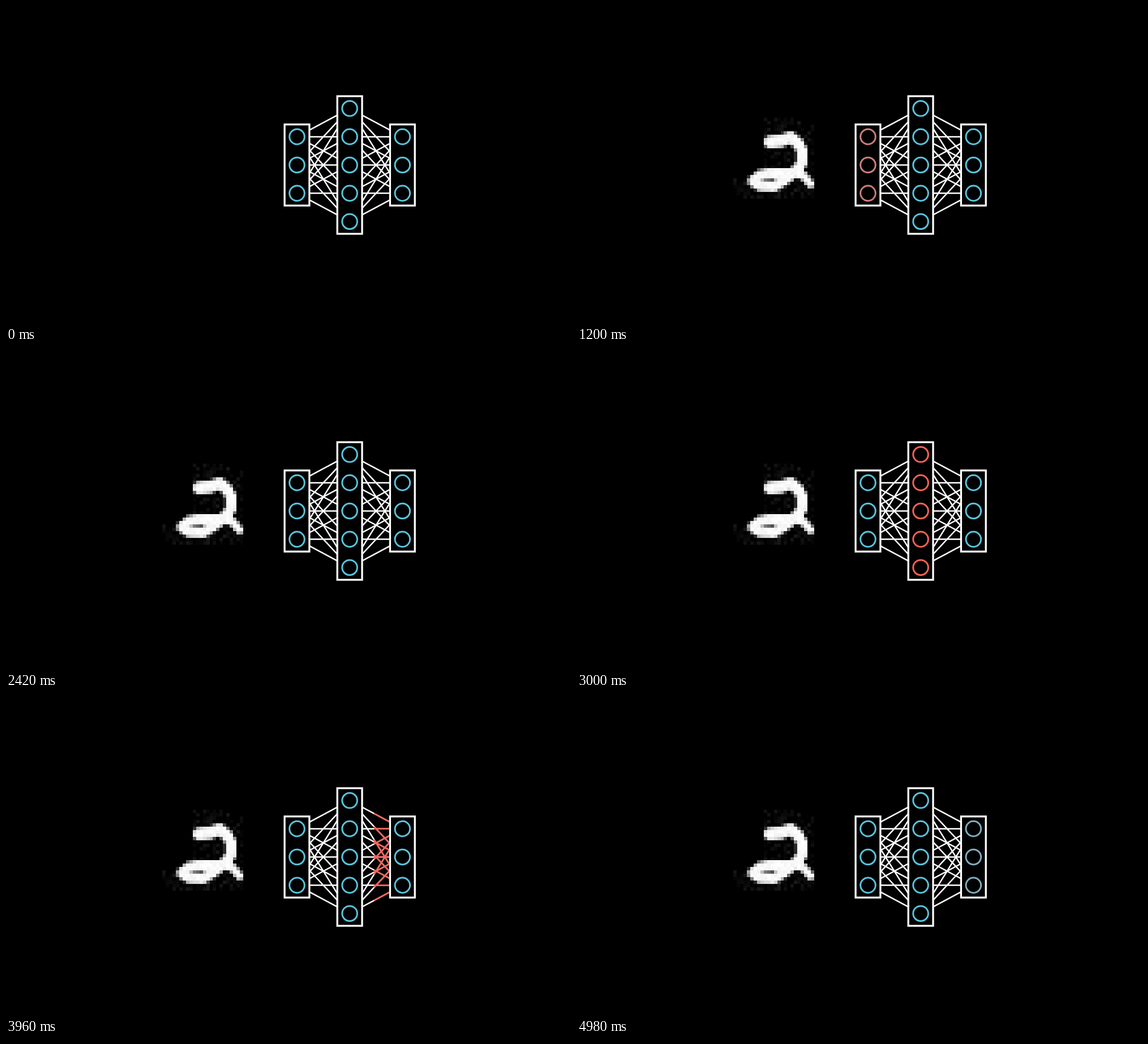
An HTML page for the animation above (5000 ms loop, 998 by 561 pixels).

```html
<!DOCTYPE html>
<html lang="en">
<head>
<meta charset="utf-8">
<title>Neural network forward pass</title>
<style>
  html, body { margin: 0; width: 100%; height: 100%; overflow: hidden; background: #000; }
  svg { display: block; width: 100%; height: 100%; }
</style>
</head>
<body>
<svg id="stage" viewBox="0 0 998 561"></svg>
<script>
const LOOP = 5;
const PERIOD = 1.66;          // one layer plus the edges after it
const BLUE = [88, 196, 221], RED = [252, 98, 85];
const MID_Y = 280.5, GAP = 49.85;
const IMAGE = { x: 276, y: 197, size: 167, cells: 28 };
const LAYERS = [{ x: 514, n: 3 }, { x: 607.1, n: 5 }, { x: 700.3, n: 3 }];

const stage = document.getElementById('stage');
const clamp = v => Math.min(1, Math.max(0, v));
const mix = (a, b, t) => a + (b - a) * t;
const rgb = c => `rgb(${c.map(Math.round)})`;
const nodeY = (layer, i) => MID_Y + (i - (layer.n - 1) / 2) * GAP;

function set(el, attrs) {
  for (const key in attrs) el.setAttribute(key, attrs[key]);
  return el;
}

function add(parent, tag, attrs) {
  const el = document.createElementNS('http://www.w3.org/2000/svg', tag);
  return parent.appendChild(set(el, attrs));
}

// Normalised sigmoid easing from start over the given duration.
function smooth(time, start, duration) {
  const sigmoid = v => 1 / (1 + Math.exp(-v));
  const low = sigmoid(-5);
  const t = clamp((time - start) / duration);
  return clamp((sigmoid(10 * (t - 0.5)) - low) / (1 - 2 * low));
}

// Pen strokes of the handwritten digit: column, row, half width.
const STROKES = [
  [[10.9, 7.1, 1.85], [14, 6.9, 1.85], [17, 5.8, 1.75], [19.1, 7.4, 1.7], [20.4, 9.6, 1.6],
   [20.4, 13, 1.6], [19.3, 15.2, 1.7], [17, 17, 1.7], [14.5, 18.9, 1.6], [12, 20.3, 1.6],
   [8, 20.1, 1.7], [6, 18.8, 1.7], [8, 17.1, 1.6], [11, 16.5, 1.6], [17, 16.6, 1.6]],
  [[18.5, 16, 1.5], [21, 17.4, 1.25], [22.9, 19.7, 1.15]]
];

// Signed distance of a point from the inked area.
function inkDistance(x, y) {
  let best = Infinity;
  for (const stroke of STROKES) {
    for (let i = 1; i < stroke.length; i++) {
      const [ax, ay, aw] = stroke[i - 1], [bx, by, bw] = stroke[i];
      const dx = bx - ax, dy = by - ay;
      const t = clamp(((x - ax) * dx + (y - ay) * dy) / (dx * dx + dy * dy));
      best = Math.min(best, Math.hypot(x - ax - dx * t, y - ay - dy * t) - mix(aw, bw, t));
    }
  }
  return best;
}

function drawDigit(parent) {
  let seed = 11;
  const random = () => (seed = seed * 16807 % 2147483647) / 2147483647;
  const cell = IMAGE.size / IMAGE.cells;
  for (let row = 0; row < 24; row++) {
    for (let col = 0; col < 24; col++) {
      const d = inkDistance(col + 0.5, row + 0.5);
      const grain = random(), amount = random();
      let level = clamp(0.5 - d / 0.9) * (242 + 13 * amount);
      const speckled = d < 5 && (col > 8 || row > 17) && grain < 0.45;
      if (level < 8 && speckled) level = 5 + 20 * amount * amount;
      if (level < 3) continue;
      add(parent, 'rect', {
        x: IMAGE.x + col * cell, y: IMAGE.y + row * cell, width: cell, height: cell,
        fill: rgb([level, level, level])
      });
    }
  }
}

add(stage, 'rect', { width: 998, height: 561, fill: '#000' });

const edgeLayer = add(stage, 'g', { stroke: '#fff', 'stroke-width': 2.5 });
const flashLayer = add(stage, 'g', { stroke: rgb(RED), 'stroke-width': 2.5 });
const dotLayer = add(stage, 'g', { fill: rgb(RED) });

const flashes = [];
LAYERS.slice(1).forEach((to, index) => {
  const from = LAYERS[index];
  for (let i = 0; i < from.n; i++) {
    for (let j = 0; j < to.n; j++) {
      const a = [from.x, nodeY(from, i)], b = [to.x, nodeY(to, j)];
      add(edgeLayer, 'line', { x1: a[0], y1: a[1], x2: b[0], y2: b[1] });
      flashes.push({ el: add(flashLayer, 'line', {}), a, b, index });
    }
  }
});

const dots = Array.from({ length: LAYERS[0].n }, () => add(dotLayer, 'circle', { r: 3.5 }));

add(stage, 'rect', { x: IMAGE.x, y: IMAGE.y, width: IMAGE.size, height: IMAGE.size, fill: '#000' });
const digit = add(stage, 'g', { 'shape-rendering': 'crispEdges' });
drawDigit(digit);

const nodeGroups = LAYERS.map(layer => {
  const half = (layer.n - 1) / 2 * GAP + 21.7;
  add(stage, 'rect', {
    x: layer.x - 21.9, y: MID_Y - half, width: 43.8, height: 2 * half,
    fill: '#000', stroke: '#fff', 'stroke-width': 3.3
  });
  const group = add(stage, 'g', { fill: 'none', 'stroke-width': 3 });
  for (let i = 0; i < layer.n; i++) {
    add(group, 'circle', { cx: layer.x, cy: nodeY(layer, i), r: 13.3 });
  }
  return group;
});

function render(time) {
  digit.setAttribute('opacity', smooth(time, 0, 0.39));

  // Dots leave from behind the image and end behind the first layer.
  const move = smooth(time, 0.735, 0.365);
  const cx = IMAGE.x + IMAGE.size / 2;
  dots.forEach((dot, i) => set(dot, {
    cx: mix(cx, LAYERS[0].x, move),
    cy: mix(MID_Y, nodeY(LAYERS[0], i), move)
  }));

  nodeGroups.forEach((group, i) => {
    const local = time - i * PERIOD;
    const heat = smooth(local, 1.095, 0.18) - smooth(local, 1.55, 0.18);
    group.setAttribute('stroke', rgb(BLUE.map((v, k) => mix(v, RED[k], heat))));
  });

  for (const { el, a, b, index } of flashes) {
    const head = 1.5 * smooth(time, 1.73 + index * PERIOD, 1.025);
    const end = clamp(head), start = clamp(head - 0.5);
    set(el, {
      x1: mix(a[0], b[0], start), y1: mix(a[1], b[1], start),
      x2: mix(a[0], b[0], end), y2: mix(a[1], b[1], end)
    });
  }
}

const began = performance.now();
function tick() {
  render((performance.now() - began) / 1000 % LOOP);
  requestAnimationFrame(tick);
}
tick();
</script>
</body>
</html>
```
